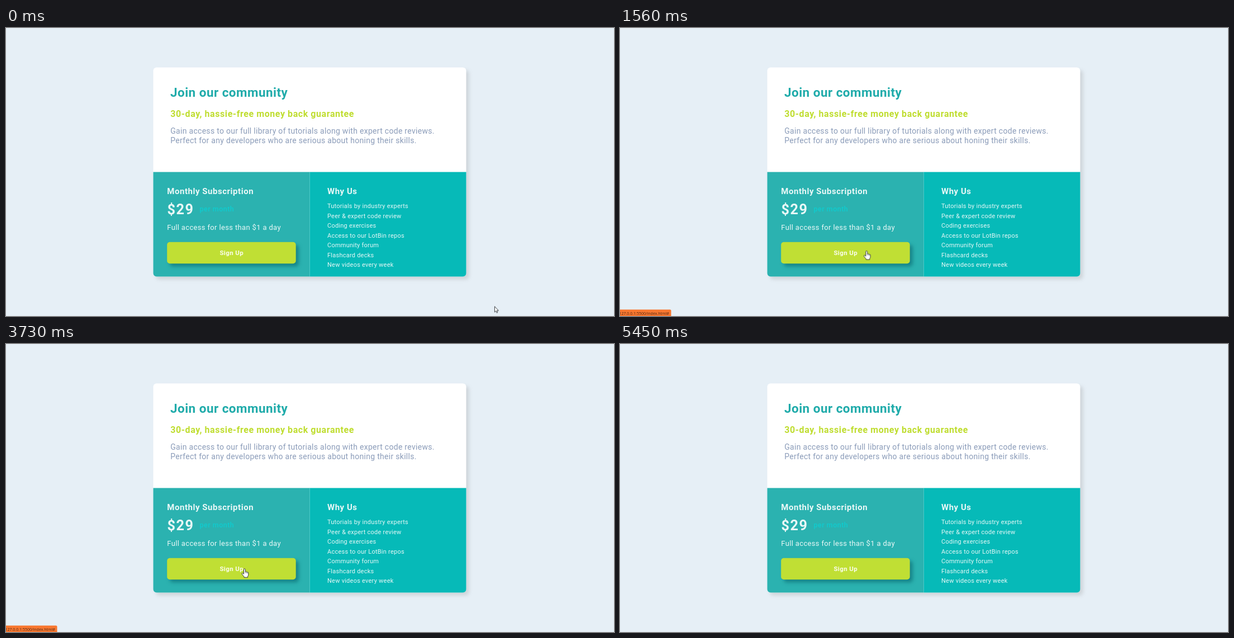
These frames come from a looping animation (1088 px wide and 515 px high, 5.49 s). An HTML page:

```html
<!DOCTYPE html>
<html lang="en">
<head>
<meta charset="utf-8">
<title>Join our community</title>
<style>
  html, body { margin: 0; width: 100%; height: 100%; overflow: hidden; background: #e6eff6; }
  svg { display: block; }
  text { font-family: Roboto, Inter, sans-serif; white-space: pre; }
  .card { fill: #fff; filter: drop-shadow(5px 5px 3px rgba(90, 85, 80, .17)); }
  .button { fill: #c0df34; filter: drop-shadow(5px 5px 3px rgba(0, 85, 95, .5)); }
  .title { font-size: 22.5px; font-weight: 600; letter-spacing: .45px; fill: #1fabaa; }
  .promise { font-size: 16px; font-weight: 600; letter-spacing: .57px; fill: #bfdd2f; }
  .intro { font-size: 14px; letter-spacing: .29px; fill: #8b9cb9; }
  .head { font-size: 15px; font-weight: 600; letter-spacing: .53px; fill: #eaf8f7; }
  .price { font-size: 25.3px; font-weight: 600; letter-spacing: 1.5px; fill: #e8f7f6; }
  .per { font-size: 12.5px; font-weight: 500; letter-spacing: .5px; fill: #0fcccf; }
  .offer { font-size: 13px; letter-spacing: .35px; fill: #eaf8f7; }
  .label { font-size: 11.5px; font-weight: 600; letter-spacing: .38px; fill: #fafdec; }
  .list { font-size: 11px; letter-spacing: .24px; fill: #e6f8f7; }
  .status text { font: 7px "Open Sans", "Noto Sans", sans-serif; fill: #4f2815; }
  .pointer path { fill: #fff; stroke: #23272b; stroke-width: .9; stroke-linejoin: round; }
  .pointer .creases { fill: none; stroke-width: .6; }

  .pointer { animation: move 5.49s linear infinite; }
  .status { animation: fade 5.49s linear infinite; }
  .hand { animation: hover 5.49s step-end infinite; }
  .arrow { animation: hover 5.49s step-end infinite; --out: 1; --over: 0; }

  @keyframes move {
    0% { transform: translate(874px, 497.5px); }
    3.8% { transform: translate(874px, 497.5px); animation-timing-function: steps(9, start); }
    14.5% { transform: translate(565px, 420px); animation-timing-function: steps(6, start); }
    22.2% { transform: translate(446px, 391.2px); animation-timing-function: steps(1, start); }
    23%, 45.3% { transform: translate(441.3px, 398.5px); animation-timing-function: steps(5, start); }
    51.9%, 58.2% { transform: translate(551.5px, 399.3px); animation-timing-function: steps(5, start); }
    64.2%, 82.3% { transform: translate(427px, 401.7px); animation-timing-function: steps(6, start); }
    90.6% { transform: translate(1032px, 466.8px); animation-timing-function: steps(2, start); }
    93%, 100% { transform: translate(1100px, 482px); }
  }
  @keyframes fade {
    0%, 26.2% { opacity: 0; animation-timing-function: steps(3, start); }
    29.5%, 54% { opacity: 1; animation-timing-function: steps(4, start); }
    58.8%, 66.8% { opacity: 0; animation-timing-function: steps(2, start); }
    69%, 93% { opacity: 1; animation-timing-function: steps(3, start); }
    96.9%, 100% { opacity: 0; }
  }
  @keyframes hover {
    0%, 49.3%, 82.3%, 100% { opacity: var(--out, 0); }
    17.1%, 59.5% { opacity: var(--over, 1); }
  }
</style>
</head>
<body>
<svg width="1088" height="515" viewBox="0 0 1088 515">
  <rect class="card" x="263.5" y="70.5" width="560" height="374" rx="6"/>
  <path fill="#2bb2b0" d="M263.5 257.5h280v187h-274a6 6 0 0 1-6-6Z"/>
  <path fill="#06bab8" d="M543.5 257.5h280v181a6 6 0 0 1-6 6h-274Z"/>

  <text class="title" x="294" y="123">Join our community</text>
  <text class="promise" x="294.3" y="158.5">30-day, hassie-free money back guarantee</text>
  <g class="intro">
    <text x="294.3" y="188.5">Gain access to our full library of tutorials along with expert code reviews.</text>
    <text x="294.3" y="205.5">Perfect for any developers who are serious about honing their skills.</text>
  </g>

  <text class="head" x="288.3" y="297">Monthly Subscription</text>
  <text class="price" x="288.5" y="333.2">$29</text>
  <text class="per" x="346.5" y="328">per month</text>
  <text class="offer" x="288.3" y="361">Full access for less than $1 a day</text>
  <rect class="button" x="288.2" y="382.7" width="230.5" height="38.5" rx="5"/>
  <text class="label" x="382.4" y="406.4">Sign Up</text>

  <text class="head" x="575" y="297">Why Us</text>
  <g class="list">
    <text x="575" y="322.3">Tutorials by industry experts</text>
    <text x="575" y="339.8">Peer &amp; expert code review</text>
    <text x="575" y="357.2">Coding exercises</text>
    <text x="575" y="374.7">Access to our LotBin repos</text>
    <text x="575" y="392.1">Community forum</text>
    <text x="575" y="409.6">Flashcard decks</text>
    <text x="575" y="427">New videos every week</text>
  </g>

  <g class="status">
    <path fill="#f8772f" d="M0 503.5H89.5a2 2 0 0 1 2 2V515H0Z"/>
    <text x="-1.5" y="512.7">127.0.0.1:5500/index.html#</text>
  </g>

  <g class="pointer">
    <path class="arrow" d="M.4 .4V10.6L2.7 8.5L4.2 11.8L5.8 11.1L4.3 7.9H7.4Z"/>
    <g class="hand">
      <path d="M-1.5 9.6V1.5Q-1.4 .2-.1 .2T1.3 1.5V5.4Q2.5 4.6 3.5 5.8Q4.7 5.2 5.3 6.5Q6.8 6.2 6.8 7.8V11Q6.6 12.8 5.5 13.8V15.6H-1V14.2Q-2.6 12.6-4.7 9.7Q-5.3 8.2-4 7.8Q-2.9 7.6-1.5 9.6Z"/>
      <path class="creases" d="M1.3 5.4V8M3.5 5.8V8.2M5.3 6.5V8.5"/>
    </g>
  </g>
</svg>
</body>
</html>
```
